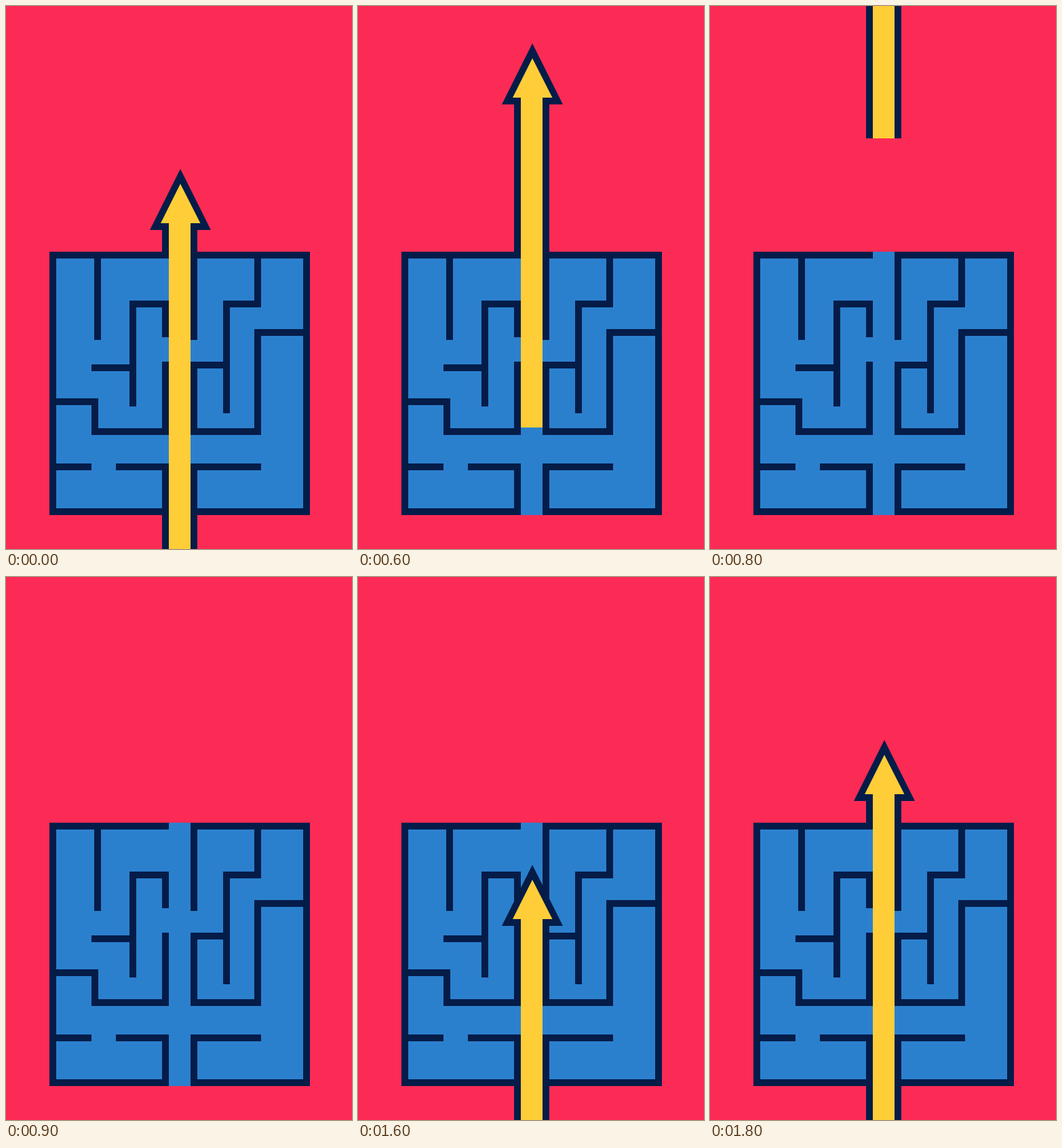
An HTML page that plays this animation: 510x800 px, repeating every 1.9 s.

```html
<!DOCTYPE html>
<html lang="en">
<head>
<meta charset="utf-8">
<title>Arrow through a maze</title>
<style>
  html, body { margin: 0; width: 100%; height: 100%; overflow: hidden; background: #fb2b55; }
  svg { display: block; width: 100%; height: 100%; }
</style>
</head>
<body>
<svg viewBox="0 0 510 800">
  <clipPath id="outside"><path d="M0 0H510V362H0ZM0 750H510V800H0Z"/></clipPath>

  <path fill="#2b80ce" d="M64 362H448V750H64Z"/>
  <path fill="none" stroke="#051c48" stroke-width="10" d="
    M162 679H235V745H69V367H240
    M376 679H277V745H443V367H277V492
    M135 367V492
    M187 590V439H235V488
    M126 533H187
    M69 583H131V627H235V524
    M69 679H126
    M371 367V439H325V600
    M325 529H277V627H371V481H443"/>

  <!-- Inside the maze its own walls border the shaft -->
  <g clip-path="url(#outside)">
    <path class="moving" fill="#051c48" d="M230 90H282V566H230Z"/>
  </g>
  <g class="moving">
    <path fill="#051c48" d="M257 0L302 90H282V128H230V90H212Z"/>
    <path fill="#ffcd38" d="M257 22L286.5 80H272V566H240V80H228Z"/>
  </g>
</svg>
<script>
  const LOOP = 1900, STEP = 100, REST_Y = 240;
  const moving = document.querySelectorAll('.moving');

  // Height of the arrow tip: accelerates out of the top, slows in from below
  function tipY(step) {
    const offset = step < 15
      ? -56 * Math.max(0, step - 4) ** 1.7235
      : 41.8 * Math.max(0, 18 - step) ** 2.139;
    return REST_Y + Math.round(offset);
  }

  function draw(now) {
    const y = tipY(Math.floor(now % LOOP / STEP));
    for (const part of moving) part.setAttribute('transform', `translate(0 ${y})`);
  }

  const start = performance.now();
  function tick() {
    draw(performance.now() - start);
    requestAnimationFrame(tick);
  }
  tick();
</script>
</body>
</html>
```
